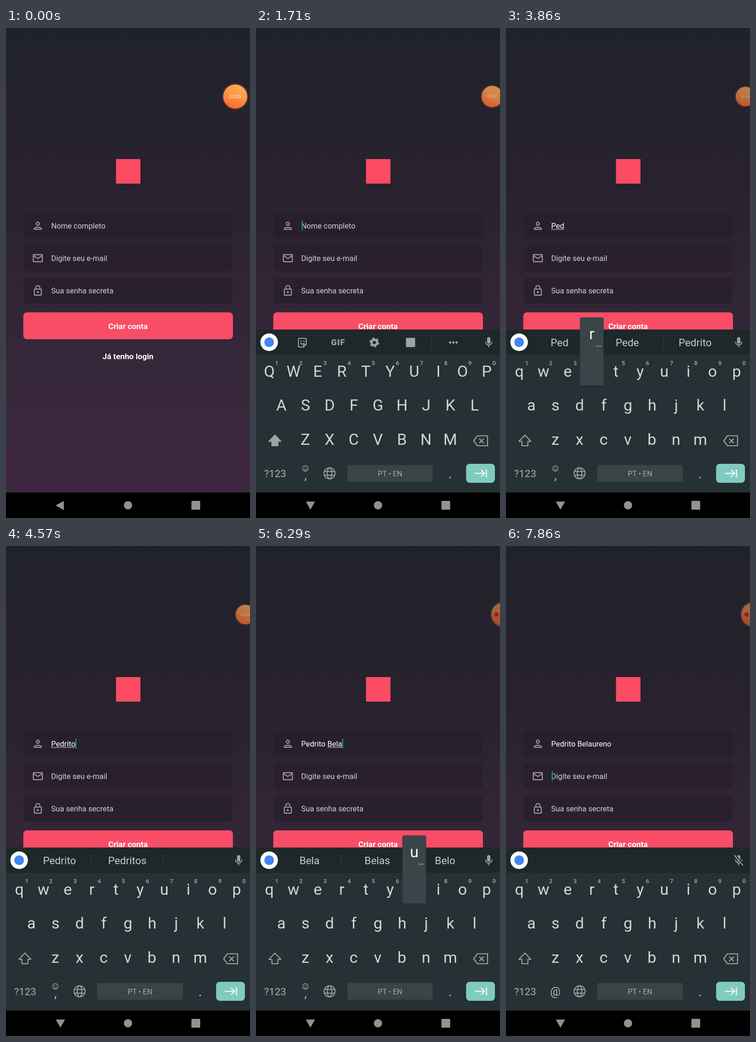
An HTML page for the animation above (8000 ms loop, 529 by 1058 pixels).

```html
<!DOCTYPE html>
<html lang="pt">
<head>
<meta charset="utf-8">
<title>Criar conta</title>
<style>
html, body { margin: 0; width: 100%; height: 100%; overflow: hidden; background: #000; }
svg { display: block; width: 100%; height: 100%; font-family: Roboto, sans-serif; }
text { white-space: pre; }
.line { fill: none; stroke-linecap: butt; stroke-linejoin: round; }
</style>
</head>
<body>
<svg id="stage" viewBox="0 0 529 1058"></svg>
<script>
const LOOP = 8000;
const ROWS = ['qwertyuiop', 'asdfghjkl', 'zxcvbnm'];
const ROW_X = [29, 55, 107];
const STEP_X = 52.35, STEP_Y = 73.4;
const FIELD_X = 98;
const SUGGEST_X = [116, 263, 410];
const HIGHLIGHT = '#3a4549';
const ICON = '#9da3a4';

// Each row overrides part of the state from its time on.
const STEPS = [
  [0, { kb: [0, 70], caps: false, pop: '', press: '', strip: 'tools', done: '', comp: '',
        caret: false, field: 0, email: false, sec: 0, badge: [497, 26, 1], docked: false }],
  [710, { kb: [.12, 60], caret: true }],
  [860, { kb: [.5, 28] }],
  [1000, { kb: [.87, 7] }],
  [1140, { kb: [1, 1], sec: 1 }],
  [1290, { kb: [1, 0] }],
  [1570, { press: 'shift', badge: [504, 25, .95] }],
  [1710, { press: '', caps: true, badge: [512, 23, .82] }],
  [1860, { badge: [519, 21, .7] }],
  [2140, { sec: 2 }],
  [2290, { pop: 'p' }],
  [2430, { comp: 'P' }],
  [2570, { pop: '', caps: false }],
  [2710, { pop: 'e', strip: ['P', 'Por', 'Para'] }],
  [2860, { pop: '', comp: 'Pe', strip: ['Pe', 'Pelo', 'Pela'] }],
  [3000, { pop: 'd' }],
  [3140, { comp: 'Ped', strip: ['Ped', 'Pede', 'Pedrito'], sec: 3 }],
  [3290, { pop: '' }],
  [3710, { pop: 'r', caret: false }],
  [4000, { pop: 'i', comp: 'Pedr', strip: ['Pedr', 'Pedra', 'Pedrito'], caret: true }],
  [4140, { pop: '', comp: 'Pedri', sec: 4 }],
  [4290, { pop: 't' }],
  [4430, { pop: 'o', comp: 'Pedrit', strip: ['Pedrit', 'Pedrito', ''] }],
  [4570, { pop: '', comp: 'Pedrito', strip: ['Pedrito', 'Pedritos', ''] }],
  [4710, { press: 'space', done: 'Pedrito ', comp: '', strip: ['e', 'da', 'de'] }],
  [4860, { press: 'shift', caps: true }],
  [5000, { press: '', pop: 'b' }],
  [5140, { pop: '', caps: false, comp: 'B', strip: ['B', 'Bom', 'Boa'], sec: 5 }],
  [5570, { comp: 'Be', strip: ['Be', 'Beijo', 'Belas'], badge: [536, 26, .57], docked: true }],
  [5860, { pop: 'l' }],
  [6000, { pop: '', comp: 'Bel', strip: ['Bel', 'Bela', 'Belo'] }],
  [6140, { pop: 'a' }],
  [6290, { pop: 'u', comp: 'Bela', strip: ['Bela', 'Belas', 'Belo'] }],
  [6430, { pop: 'r', comp: 'Belau', strip: ['Belau', 'Belaureno', ''] }],
  [6570, { pop: 'e', comp: 'Belaur', strip: ['Belaur', 'Belaureno', ''] }],
  [6710, { comp: 'Belaure' }],
  [6860, { pop: '', strip: ['Belaure', 'Belaureno', ''] }],
  [7000, { pop: 'n', comp: 'Belauren', strip: ['Belauren', 'Belaureno', ''] }],
  [7140, { pop: '', comp: 'Belaureno', strip: ['Belaureno', '', ''] }],
  [7710, { press: 'enter', done: 'Pedrito Belaureno', comp: '', field: 1, strip: 'empty' }],
  [7860, { press: '', email: true }],
];

const states = [];
STEPS.reduce((state, [at, change]) => {
  const next = { ...state, ...change };
  states.push({ at, ...next });
  return next;
}, {});

const ruler = document.createElement('canvas').getContext('2d');
function textWidth(value) {
  ruler.font = '16.5px Roboto, sans-serif';
  return ruler.measureText(value).width;
}

const text = (x, y, size, fill, value, extra = '') =>
  `<text x="${x}" y="${y}" font-size="${size}" fill="${fill}" ${extra}>${value}</text>`;
const label = (x, y, size, fill, value, extra = '') =>
  text(x, y, size, fill, value, `text-anchor="middle" ${extra}`);
const rect = (x, y, w, h, r, fill, extra = '') =>
  `<rect x="${x}" y="${y}" width="${w}" height="${h}" rx="${r}" fill="${fill}" ${extra}/>`;
const circle = (x, y, r, fill, extra = '') =>
  `<circle cx="${x}" cy="${y}" r="${r}" fill="${fill}" ${extra}/>`;
const path = (d, stroke, width = 2, extra = '') =>
  `<path class="line" d="${d}" stroke="${stroke}" stroke-width="${width}" ${extra}/>`;
const ring = (x, y, r, stroke, width) =>
  circle(x, y, r, 'none', `stroke="${stroke}" stroke-width="${width}"`);

const DEFS = `<defs>
  <linearGradient id="night" x2="0" y2="1">
    <stop offset="0" stop-color="#20222a"/><stop offset=".33" stop-color="#28222e"/>
    <stop offset=".62" stop-color="#332637"/><stop offset="1" stop-color="#3e2841"/>
  </linearGradient>
  <linearGradient id="ember" x1=".7" y1="0" x2=".3" y2="1">
    <stop offset="0" stop-color="#ffab50"/><stop offset=".45" stop-color="#fd974a"/>
    <stop offset="1" stop-color="#fb672c"/>
  </linearGradient>
</defs>`;

const FIELDS = [
  ['Nome completo', c => ring(12, 8, 3, c, 2) + path('M5 19v-1c0-2 4.7-3.1 7-3.1s7 1.1 7 3.1v1z', c)],
  ['Digite seu e-mail', c => path('M4 5H20a1 1 0 0 1 1 1V18a1 1 0 0 1-1 1H4a1 1 0 0 1-1-1V6a1 1 0 0 1 1-1zM3 7l9 5.6L21 7', c)],
  ['Sua senha secreta', c => path('M6 9H18a1 1 0 0 1 1 1V20a1 1 0 0 1-1 1H6a1 1 0 0 1-1-1V10a1 1 0 0 1 1-1zM8 9V6a4 4 0 0 1 8 0V9', c) + circle(12, 15, 2, c)],
];

function form(s) {
  let out = rect(0, 0, 529, 1003, 0, 'url(#night)') + rect(238.5, 283, 53, 53, 0, '#fc4c64');
  const typed = s.done + s.comp;
  FIELDS.forEach(([hint, icon], i) => {
    const y = 399 + 70 * i;
    const value = i === 0 && typed;
    out += rect(38, y, 453.5, 56, 8, '#281f2c', 'opacity=".85"');
    out += `<g transform="translate(69 ${y + 28}) scale(1.09) translate(-12 -12)">${icon('#a198a3')}</g>`;
    out += text(FIELD_X, y + 34, 16.5, value ? '#fff' : '#d6d1d8', value || hint);
    if (i === 0 && s.comp) {
      const from = FIELD_X + textWidth(s.done);
      out += rect(from, y + 35.5, textWidth(s.comp), 1, 0, '#e6e2e8');
    }
    if (s.caret && s.field === i) {
      const end = FIELD_X + (value ? textWidth(typed) : 1);
      out += rect(end, y + 17, 2.4, 21, 0, '#14937f');
    }
  });
  return out + rect(37.5, 614, 454.5, 58, 8, '#f94d66')
    + label(264.5, 650, 17.3, '#fff', 'Criar conta', 'font-weight="700"')
    + label(264.5, 715, 17.3, '#fff', 'Já tenho login', 'font-weight="700"');
}

function microphone(off) {
  const x = 504.5;
  const body = rect(x - 3.6, 667.5, 7.2, 14, 3.6, ICON)
    + path(`M${x - 7} 677a7 7.5 0 0 0 14 0M${x} 684.500v5`, ICON);
  return off
    ? body + path('M496 667l18 22', '#1f2829', 5) + path('M495 667.500l18.500 22', ICON)
    : body;
}

function tools() {
  const face = path('M94 670H107a2 2 0 0 1 2 2V683l-6 6H94a2 2 0 0 1-2-2V672a2 2 0 0 1 2-2zM103 689v-4a2 2 0 0 1 2-2h4', ICON)
    + circle(97.500, 676, 1.5, ICON) + circle(104, 676, 1.5, ICON) + path('M96 680q4.500 5 9 0', ICON);
  const gear = ring(256.5, 679, 6, ICON, 5)
    + circle(256.5, 679, 8.8, 'none', `stroke="${ICON}" stroke-width="3.4" stroke-dasharray="4.6 4.615"`);
  const dots = [421, 428, 435].map(x => circle(x, 679, 2.5, ICON)).join('');
  return face + gear + dots
    + label(178, 685, 18, ICON, 'GIF', 'font-weight="900" letter-spacing="1"')
    + rect(325, 669, 20, 20, 2, ICON)
    + rect(380.5, 665, 1, 27, 0, '#3a4547');
}

function strip(s) {
  let out = rect(0, 651, 529, 55, 0, '#1f2829')
    + circle(28.5, 678.5, 19, '#fff') + circle(28.5, 678.5, 10.5, '#4285f4');
  if (s.strip === 'tools') out += tools();
  else if (s.strip !== 'empty') {
    out += [185, 341].map(x => rect(x - .5, 664, 1, 29, 0, '#364143')).join('');
    out += s.strip.map((word, i) => label(SUGGEST_X[i], 687, 22.5, '#c6cbcc', word)).join('');
  }
  return out + microphone(s.email);
}

const cased = (s, key) => s.caps ? key.toUpperCase() : key;

function letters(s) {
  return ROWS.map((row, r) => [...row].map((key, i) => {
    const x = ROW_X[r] + STEP_X * i;
    const digit = r ? '' : label(x + 16, 728, 13, '#8f9698', (i + 1) % 10, 'font-weight="700"');
    return digit + label(x, 753 + STEP_Y * r, 34, '#d2d6d7', cased(s, key));
  }).join('')).join('');
}

function popup(s) {
  if (!s.pop) return '';
  const r = ROWS.findIndex(row => row.includes(s.pop));
  const x = ROW_X[r] + STEP_X * ROWS[r].indexOf(s.pop);
  const y = 625 + STEP_Y * r;
  return rect(x - 26, y - .5, 52, 149, 5, '#1a2224', 'opacity=".5"')
    + rect(x - 25.5, y, 51, 147, 4, HIGHLIGHT)
    + label(x, y + 47, 34, '#f2f4f4', cased(s, s.pop))
    + [-4, 0, 4].map(d => circle(x + 14.500 + d, y + 62, 1.1, '#d2d6d7')).join('');
}

function bottomKeys(s) {
  const smile = ring(107, 951, 6, ICON, 1.3) + circle(104.8, 949.5, 1, ICON)
    + circle(109.2, 949.5, 1, ICON) + path('M104 953q3 3.500 6 0', ICON, 1.3)
    + label(107.5, 975, 25, '#c6cbcc', ',');
  const globe = ring(159.5, 961.5, 12, ICON, 2)
    + `<ellipse cx="159.5" cy="961.5" rx="5" ry="12" fill="none" stroke="${ICON}" stroke-width="2"/>`
    + path('M148.500 957.500h22M148.500 965.500h22', ICON);
  const enter = rect(455.5, 941, 62.5, 41, 8, s.press === 'enter' ? '#a3dad2' : '#80cbc0')
    + path('M474 961.500h21M488 954l7.500 7.500-7.500 7.500M499.500 953v17', '#fff', 2.2);
  return label(41.5, 970, 22, '#8f9597', '?123', 'font-weight="500"')
    + (s.email ? label(107, 971, 25, '#b4babb', '@') : smile) + globe
    + rect(198, 943.5, 185, 36, 3, s.press === 'space' ? '#4b5659' : '#394447')
    + label(290.5, 967.5, 16, '#a3a9ab', 'PT • EN')
    + label(421, 972, 28, '#d2d6d7', '.') + enter;
}

function keyboard(s) {
  const [alpha, drop] = s.kb;
  if (!alpha) return '';
  const shift = (s.press === 'shift' ? rect(6, 853, 69, 66, 4, HIGHLIGHT) : '')
    + `<path d="M41 879L54 892.500H47.500V902H34.500V892.500H28z" fill="${s.caps ? ICON : 'none'}" stroke="${ICON}" stroke-width="2.2" stroke-linejoin="round"/>`;
  const erase = path('M480 880.500H502V902H480L472 891.250zM484 886.500l10 10M494 886.500l-10 10', ICON, 2.2);
  return `<g opacity="${alpha}" transform="translate(0 ${drop})">`
    + rect(0, 706, 529, 297, 0, '#253134') + rect(0, 1003, 529, 55, 0, '#000')
    + strip(s) + letters(s) + shift + erase + bottomKeys(s) + popup(s) + '</g>';
}

function navigation(s) {
  const back = s.kb[0] ? 'M108 1022.500H128L118 1040z' : 'M107.500 1031L125.500 1021V1041z';
  return `<path d="${back}" fill="#929292"/>` + circle(264.5, 1030.5, 9, '#929292')
    + rect(402, 1021, 19, 19, 1.5, '#929292');
}

function badge(s) {
  const [x, r, alpha] = s.badge;
  const face = s.docked ? '' : label(0, 3.8, 10, '#ffe3cf', `00:0${s.sec}`);
  return `<g transform="translate(${x} 148) scale(${r / 26})" opacity="${alpha}">`
    + circle(0, 0, 29, '#7a3f33', 'opacity=".45"') + circle(0, 0, 26, 'url(#ember)') + face + '</g>'
    + (s.docked ? circle(521.5, 148, 4.6, '#b50d1c') : '');
}

const stage = document.getElementById('stage');
const start = performance.now();
let shown;

function tick() {
  const t = (performance.now() - start) % LOOP;
  const s = states.findLast(state => state.at <= t);
  if (s !== shown) {
    shown = s;
    stage.innerHTML = DEFS + form(s) + rect(0, 1003, 529, 55, 0, '#000')
      + keyboard(s) + navigation(s) + badge(s);
  }
  requestAnimationFrame(tick);
}
tick();
</script>
</body>
</html>
```
